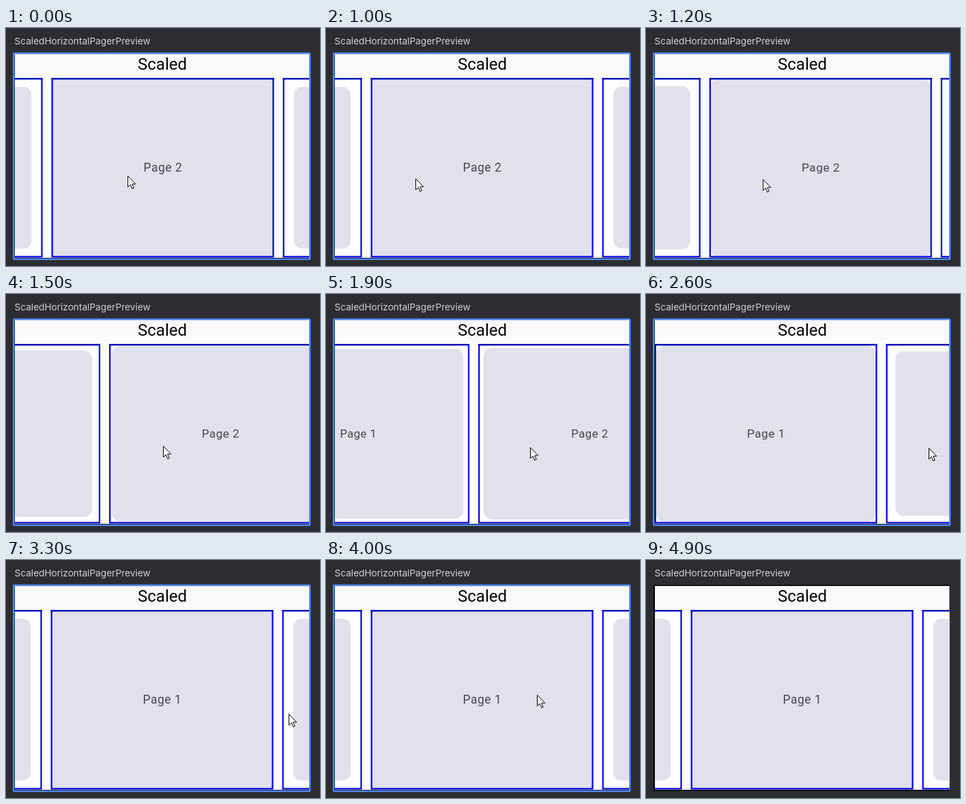
These frames come from a looping animation (460 by 348 pixels, 5 s). An HTML page:

```html
<!DOCTYPE html>
<html lang="en">
<head>
<meta charset="utf-8">
<title>Scaled pager</title>
<style>
html, body { margin: 0; height: 100%; overflow: hidden; background: #2b2d30; }
svg { display: block; }
.label { font: 13.65px Inter, sans-serif; fill: #ced0d6; }
.title { font: 24px Roboto, sans-serif; }
.page { font: 17.45px Roboto, sans-serif; letter-spacing: .55px; fill: #46464f; }
.title, .page { text-anchor: middle; }
</style>
</head>
<body>
<svg width="460" height="348" viewBox="0 0 460 348">
  <defs><clipPath id="view"><rect x="13" y="38" width="431.5" height="298"/></clipPath></defs>
  <text class="label" x="12.5" y="24">ScaledHorizontalPagerPreview</text>
  <rect x="11" y="36.5" width="434" height="301"/>
  <g clip-path="url(#view)">
    <rect x="13" y="38" width="432" height="298" fill="#fafafa"/>
    <rect x="13" y="73" width="432" height="263" fill="#fdfdfe"/>
    <text class="title" x="229" y="61">Scaled</text>
    <g id="pager"></g>
  </g>
  <rect id="outline" x="11.2" y="37" width="434" height="301" rx="1" fill="none" stroke="#548af7" stroke-width="2.4"/>
  <path id="cursor" d="M.5 .5V16.5L4.2 13 6.8 19 9.2 18 6.7 12.1H11.7Z" fill="#fff" stroke="#000"/>
</svg>
<script>
const LOOP = 5000, STEP = 100;
const WIDTH = 326, HEIGHT = 262.5, PITCH = 339, REST = 65.6, TOP = 73;
const $ = id => document.getElementById(id);

// Keys: [time, value, value...]
const scrollKeys = [[0, 1], [100, 0], [1060, 0], [1500, 85.5], [2200, 211.5], [2600, 286]];
const cursorKeys = [[0, 178, 216], [800, 131, 220], [1000, 131, 220], [1500, 230, 222],
  [2200, 350, 225], [2600, 414, 225], [3700, 414, 225], [4200, 239, 179]];

function at(keys, t) {
  const i = keys.findIndex(k => k[0] > t);
  if (i < 0) return keys[keys.length - 1].slice(1);
  const a = keys[i - 1], b = keys[i], p = (t - a[0]) / (b[0] - a[0]);
  return a.slice(1).map((v, j) => v + (b[j + 1] - v) * p);
}

// Drag, then settle on the next page
function scroll(t) {
  if (t < 2600) return at(scrollKeys, t)[0];
  const left = 1 - Math.min(1, (t - 2600) / 570);
  return PITCH - 53 * left * left;
}

const pages = [0, 1, 2, 3].map(n => {
  const g = document.createElementNS("http://www.w3.org/2000/svg", "g");
  g.innerHTML = `<g><rect x="${-WIDTH / 2}" y="${-HEIGHT / 2}" width="${WIDTH}" height="${HEIGHT}" fill="#e1e1ec"/>
    <text class="page" x=".3" y="5.8">Page ${n}</text></g>
    <rect x="${1.1 - WIDTH / 2}" y="${1.1 - HEIGHT / 2}" width="${WIDTH - 2.2}" height="${HEIGHT - 2.2}" fill="none" stroke="#0000e8" stroke-width="2.2"/>
    <path d="M${-WIDTH / 2} ${1.1 - HEIGHT / 2}h${WIDTH}" stroke="#0000b4" stroke-width="2.2"/>`;
  $("pager").append(g);
  return g;
});

function draw(t) {
  const shift = scroll(t);
  pages.forEach((g, n) => {
    const dx = (n - 2) * PITCH + shift;
    const away = Math.min(1, Math.abs(dx) / PITCH);
    const card = g.firstChild;
    g.setAttribute("transform", `translate(${REST + WIDTH / 2 + dx} ${TOP + HEIGHT / 2})`);
    card.setAttribute("transform", `scale(${1 - away * .1})`);
    card.firstChild.setAttribute("rx", away < .01 ? 0 : 13);
  });
  $("cursor").setAttribute("transform", `translate(${at(cursorKeys, t).map(Math.round)})`);
  $("cursor").style.display = t < 4300 ? "" : "none";
  $("outline").style.display = t < 4200 ? "" : "none";
}

const start = performance.now();
function frame() {
  const t = (performance.now() - start) % LOOP;
  draw(Math.floor(t / STEP) * STEP);
  requestAnimationFrame(frame);
}
frame();
</script>
</body>
</html>
```
